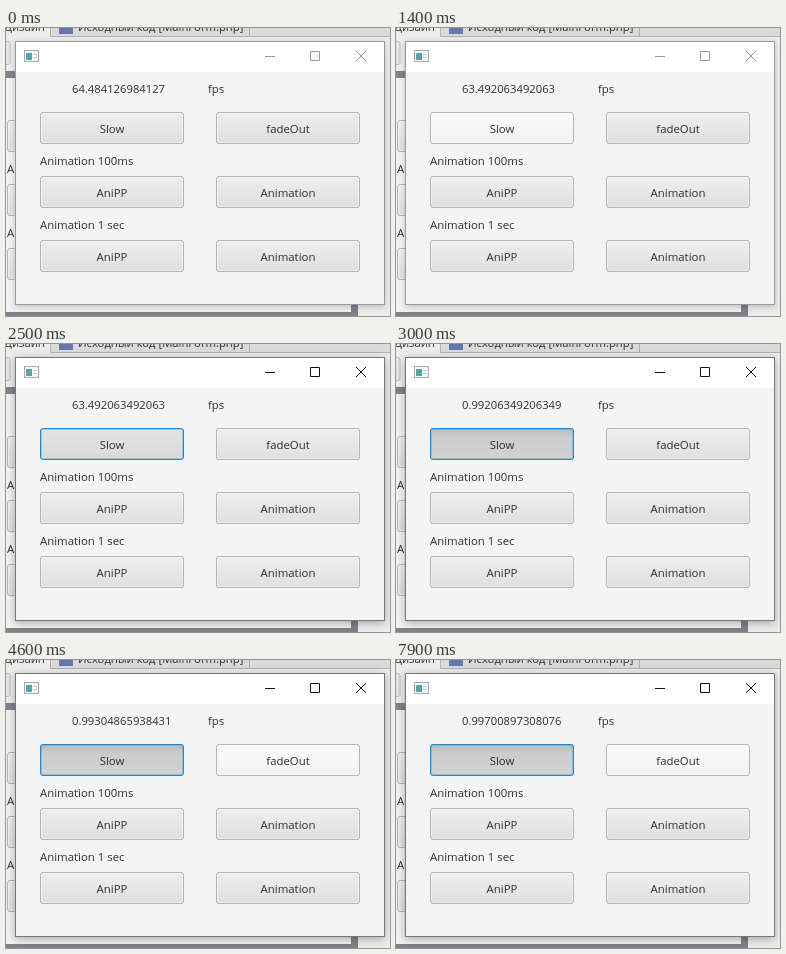
Recreate the animation shown at these times as an HTML page. Size 384 px wide and 288 px high, loop 8 s.

```html
<!DOCTYPE html>
<html lang="ru">
<head>
<meta charset="utf-8">
<title>FPS form</title>
<style>
  html, body { margin: 0; width: 100%; height: 100%; overflow: hidden; background: #ececec; }
  svg { display: block; width: 384px; height: 288px; }
  text { font: 11.4px "Open Sans", "Noto Sans", sans-serif; fill: #2e2e2e; }
  .number, .tab { font-size: 11.25px; }
  .window { fill: #f4f4f4; stroke: #999; filter: drop-shadow(0 2px 3px rgba(0, 0, 0, .2)); }
  .active .window { stroke: #777; filter: drop-shadow(0 2px 4px rgba(0, 0, 0, .3)); }
  .controls { fill: none; stroke: #999; }
  .active .controls { stroke: #111; }
  .edge { fill: none; stroke: #b5b5b5; }
  .shine { fill: none; stroke: #fff; stroke-opacity: .35; }
  .face { fill: url(#normal); }
  .hover .face { fill: url(#light); }
  .focus .face { fill: url(#focused); }
  .pressed .face { fill: url(#dark); }
  .focus .shine { stroke: #55a9d8; stroke-opacity: .5; }
  .focus .edge { stroke: #2588c4; }
</style>
</head>
<body>
<svg id="stage" viewBox="0 0 384 288">
  <defs>
    <linearGradient id="normal" x2="0" y2="1">
      <stop stop-color="#efefef"/><stop offset="1" stop-color="#dfdfdf"/>
    </linearGradient>
    <linearGradient id="light" x2="0" y2="1">
      <stop stop-color="#fafafa"/><stop offset="1" stop-color="#f3f3f3"/>
    </linearGradient>
    <linearGradient id="focused" x2="0" y2="1">
      <stop stop-color="#e4e4e4"/><stop offset="1" stop-color="#d9d9d9"/>
    </linearGradient>
    <linearGradient id="dark" x2="0" y2="1">
      <stop stop-color="#bababa"/><stop offset=".3" stop-color="#cccccc"/>
      <stop offset="1" stop-color="#d2d2d2"/>
    </linearGradient>
  </defs>

  <!-- editor behind the form -->
  <rect width="384" height="288" fill="#ececec"/>
  <rect width="384" height="8" fill="#dadada"/>
  <rect width="44" height="9" fill="#ececec"/>
  <path d="M44.5 0V8.5H384M243.5 0V8" fill="none" stroke="#b0b0b0"/>
  <text class="tab" x="39" y="3" text-anchor="end">Дизайн</text>
  <rect x="53" y="-8" width="14" height="14" fill="#6477a8"/>
  <text class="tab" x="72" y="3">Исходный код [MainForm.php]</text>
  <rect x="-10" y="13.500" width="14" height="23" rx="2" fill="#e4e4e4" stroke="#bbb"/>
  <rect x="-8" y="43" width="360" height="245" fill="#82818a"/>
  <rect x="-8" y="50" width="353" height="234" fill="#f2f2f2"/>
  <g id="preview"></g>

  <!-- form window -->
  <rect class="window" x="9.500" y="13.500" width="369" height="263"/>
  <rect x="10" y="14" width="368" height="30" fill="#fff"/>
  <rect x="18.500" y="22.500" width="14" height="11" fill="#f4f8fa" stroke="#a3adb4"/>
  <rect x="20" y="25" width="6" height="7" fill="#5aa3a0"/>
  <path d="M27 26.500H31M27 29.500H31" stroke="#c5cbd0"/>
  <path class="controls" d="M259 28.500H269M304.500 23.500H313.500V32.500H304.500ZM350 23L360 33M360 23L350 33"/>
  <text id="fps" class="number" x="66" y="65"></text>
  <text x="202" y="65">fps</text>
  <text x="34" y="137">Animation 100ms</text>
  <text x="34" y="201">Animation 1 sec</text>
  <g id="buttons"></g>
</svg>
<script>
const LOOP = 8000;
const stage = document.getElementById('stage');
const fps = document.getElementById('fps');

// Each step: start ms, frames counted, seconds elapsed
const counts = [
  [0, 65, 1.008],
  [600, 64, 1.008],
  [2600, 1, 1.008],
  [4600, 1, 1.007],
  [5600, 1, 1.008],
  [6600, 1, 1.003]
];
const slowStates = [[0, ''], [900, 'hover'], [1600, 'focus'], [2600, 'focus pressed']];
const fadeStates = [[0, ''], [4600, 'hover']];
const windowStates = [[0, ''], [1600, 'active']];

function button(x, y, label) {
  return `<g>
    <rect class="face" x="${x}" y="${y}" width="144" height="32" rx="3"/>
    <rect class="shine" x="${x + 1.5}" y="${y + 1.5}" width="141" height="29" rx="2"/>
    <rect class="edge" x="${x + .5}" y="${y + .5}" width="143" height="31" rx="2.5"/>
    <text x="${x + 72}" y="${y + 21}" text-anchor="middle">${label}</text>
  </g>`;
}

const labels = [['Slow', 'fadeOut'], ['AniPP', 'Animation'], ['AniPP', 'Animation']];
const buttons = document.getElementById('buttons');
buttons.innerHTML = labels.map((pair, row) =>
  pair.map((label, col) => button(34 + col * 176, 84 + row * 64, label)).join('')
).join('');
const [slow, fade] = buttons.children;

document.getElementById('preview').innerHTML =
  [92, 156, 220].map(y => button(1, y, '')).join('') +
  [145, 209].map(y => `<text x="1" y="${y}">Animation</text>`).join('');

function stepAt(steps, t) {
  return steps.filter(step => step[0] <= t).pop();
}

function draw(t) {
  const [, frames, seconds] = stepAt(counts, t);
  fps.textContent = (frames / seconds).toPrecision(14);
  slow.setAttribute('class', stepAt(slowStates, t)[1]);
  fade.setAttribute('class', stepAt(fadeStates, t)[1]);
  stage.setAttribute('class', stepAt(windowStates, t)[1]);
}

const start = performance.now();
function tick() {
  draw((performance.now() - start) % LOOP);
  requestAnimationFrame(tick);
}
tick();
</script>
</body>
</html>
```
